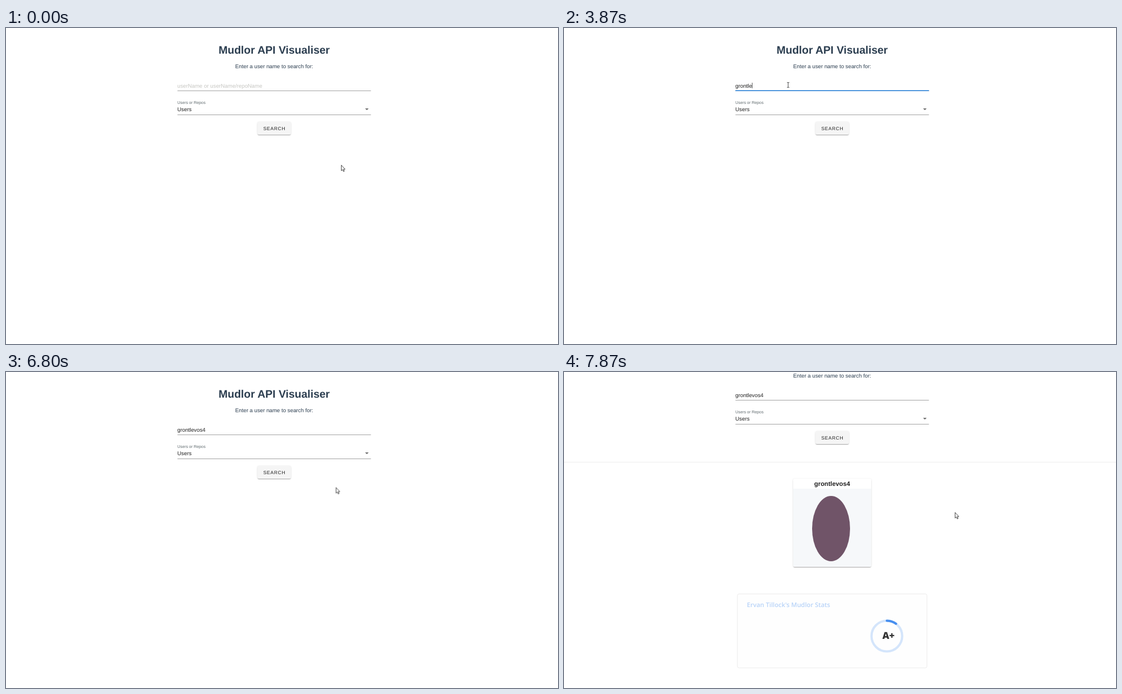
These frames come from a looping animation (990x566 px, 8000 ms). An HTML page:

```html
<!DOCTYPE html>
<html lang="en">
<head>
<meta charset="utf-8">
<title>API Visualiser</title>
<style>
  html, body { margin: 0; width: 100%; height: 100%; overflow: hidden; background: #fff; }
  #stage { position: relative; width: 990px; height: 566px; overflow: hidden; }
  #stage svg { position: absolute; left: 0; top: 0; overflow: visible; }
  #page, #button, #card, #tint, #ripple { position: absolute; }
  #page { left: 0; top: 0; width: 990px; height: 640px; }

  text { font: 9.75px "Liberation Sans", Arial, sans-serif; text-rendering: geometricPrecision; fill: #212121; white-space: pre; }
  .mid { text-anchor: middle; }
  .ink { fill: #2c3e50; }
  #heading { font-size: 19.5px; font-weight: bold; }
  #label { font-size: 7.28px; fill: #5f6a6e; }
  #hint { fill: #c6c6c2; }
  #search { font-size: 8.5px; letter-spacing: .0893em; }
  #cardName { font-size: 11.35px; font-weight: bold; }
  #statTitle { font: 600 11.3px "Open Sans", "Noto Sans", sans-serif; fill: #2f80ed; }
  #rank { font: 800 17px "Open Sans", "Noto Sans", sans-serif; fill: #333; }

  #button, #card {
    box-shadow: 0 1.9px .6px -1.2px rgba(0,0,0,.2), 0 1.2px 1.2px rgba(0,0,0,.14), 0 .6px 3px rgba(0,0,0,.12);
    border-radius: 2.5px; overflow: hidden;
  }
  #button { left: 451px; top: 168px; width: 60px; height: 22.5px; background: #f5f5f5; }
  #card { left: 411px; top: 253px; width: 140px; height: 157.5px; background: #fff; }
  #tint { inset: 0; background: #000; opacity: 0; }
  #ripple { left: -6px; top: -23.5px; width: 70px; height: 70px; border-radius: 50%; background: #000; opacity: 0; }

  #inputLine, #selectLine { fill: #a2a2a2; }
  #focusLine { transform-origin: 481px 112px; }
  #mouse path { stroke: #222; stroke-width: .85; stroke-linejoin: round; fill: #fff; }
  #mouse #beam { fill: none; }

  /* 1% of the loop is 80 ms */
  #page, #inputLine, #selectLine, #results, #loaded, #figure, #statTitle, #rank, #arc, #arrow, #beam, #hand {
    animation: 8s step-end infinite;
  }
  #tint, #ripple, #focusLine, #mouse { animation: 8s linear infinite; }

  #page { animation-name: scroll; }
  @keyframes scroll { 0% { transform: none; } 98.3%, 100% { transform: translateY(-62px); } }

  #inputLine { animation-name: inputHover; }
  @keyframes inputHover { 6.9% { fill: #5a5a5a; } 65%, 100% { fill: #a2a2a2; } }
  #selectLine { animation-name: selectHover; }
  @keyframes selectHover {
    4.9% { fill: #5a5a5a; } 6.9% { fill: #a2a2a2; }
    66% { fill: #5a5a5a; } 74%, 100% { fill: #a2a2a2; }
  }

  #focusLine { animation-name: focusLine; }
  @keyframes focusLine {
    0%, 14.1% { transform: scaleX(0); fill: #1976d2; animation-timing-function: cubic-bezier(.25,.8,.5,1); }
    17.5%, 76.87% { transform: scaleX(1); fill: #1976d2; }
    76.88% { transform: scaleX(1); fill: #22285f; animation-timing-function: cubic-bezier(.25,.8,.5,1); }
    80.6%, 100% { transform: scaleX(0); fill: #22285f; }
  }

  #tint { animation-name: tint; }
  @keyframes tint {
    0%, 3.3% { opacity: 0; } 3.8%, 4.6% { opacity: .07; } 5.2%, 75.4% { opacity: 0; }
    76%, 76.8% { opacity: .07; } 78.3%, 79.7% { opacity: .155; }
    80.8%, 83.6% { opacity: .07; } 84.6%, 100% { opacity: 0; }
  }
  #ripple { animation-name: ripple; }
  @keyframes ripple {
    0%, 76.87% { opacity: 0; transform: scale(.3); }
    77.3% { opacity: .24; }
    78.37% { opacity: .24; transform: scale(.7); }
    79.8% { opacity: .24; transform: scale(1); }
    80.85%, 100% { opacity: 0; transform: scale(1); }
  }

  #results { animation-name: results; }
  @keyframes results { 0% { visibility: hidden; } 85.8%, 100% { visibility: visible; } }
  #loaded { animation-name: loaded; }
  @keyframes loaded { 0% { opacity: 0; } 93.3%, 100% { opacity: 1; } }
  #figure { animation-name: figure; }
  @keyframes figure { 0% { opacity: 0; } 94.1%, 100% { opacity: 1; } }
  #statTitle { animation-name: statTitle; }
  @keyframes statTitle { 0% { opacity: 0; } 94.1% { opacity: .15; } 95%, 100% { opacity: .34; } }
  #rank { animation-name: rank; transform-origin: 579px 535px; }
  @keyframes rank { 0% { transform: scale(0); } 94.1% { transform: scale(.6); } 95%, 100% { transform: none; } }
  #arc { animation-name: arc; }
  @keyframes arc {
    0% { stroke-dasharray: 0 2; opacity: 0; }
    94.1% { stroke-dasharray: .045 2; opacity: .87; }
    95%, 100% { stroke-dasharray: .102 2; opacity: .87; }
  }

  #mouse { animation-name: mouse; }
  @keyframes mouse {
    0%, .6% { transform: translate(601px, 245px); }
    1.62%, 3.2% { transform: translate(505px, 193px); }
    9.9%, 63.9% { transform: translate(402px, 102px); }
    69.1%, 70.5% { transform: translate(398px, 143.5px); }
    71.6%, 73% { transform: translate(399.5px, 145px); }
    76.8%, 83.2% { transform: translate(478.5px, 181px); }
    87.2% { transform: translate(728px, 237px); }
    89.6%, 91% { transform: translate(691.5px, 243px); }
    93.3%, 100% { transform: translate(701px, 251px); }
  }
  #arrow { animation-name: arrow; }
  @keyframes arrow { 0% { visibility: visible; } 3.5% { visibility: hidden; } 83.9%, 100% { visibility: visible; } }
  #beam { animation-name: beam; }
  @keyframes beam { 0% { visibility: hidden; } 6.9% { visibility: visible; } 66%, 100% { visibility: hidden; } }
  #hand { animation-name: hand; }
  @keyframes hand {
    0% { visibility: hidden; } 3.5% { visibility: visible; } 6.9% { visibility: hidden; }
    66% { visibility: visible; } 83.9%, 100% { visibility: hidden; }
  }
</style>
</head>
<body>
<div id="stage">
  <div id="page">
    <div id="button"><div id="tint"></div><div id="ripple"></div></div>

    <svg width="990" height="640">
      <text id="heading" class="mid ink" x="481" y="46">Mudlor API Visualiser</text>
      <text class="mid ink" x="481" y="72.3">Enter a user name to search for:</text>

      <text id="hint" x="307.3" y="106.5">userName or userName/repoName</text>
      <text id="typed" x="307.3" y="106.5"></text>
      <rect id="caret" x="307.3" y="98" width=".8" height="10" fill="#333"/>
      <rect id="inputLine" x="307.5" y="112" width="347" height="1"/>
      <rect id="focusLine" x="307.5" y="111.5" width="347" height="1.5"/>

      <text id="label" x="307.3" y="135.5">Users or Repos</text>
      <text x="307.3" y="149">Users</text>
      <path d="M644 144H650.4L647.2 147.2Z" fill="#707070"/>
      <rect id="selectLine" x="307.5" y="155" width="347" height="1"/>

      <text id="search" class="mid" x="481.4" y="182.6">SEARCH</text>
    </svg>

    <div id="results">
      <div id="card"></div>
      <svg width="990" height="640">
        <rect y="223" width="990" height="1" fill="#eee"/>
        <text id="cardName" class="mid" x="481" y="266">grontlevos4</text>
        <g id="loaded">
          <path d="M411 271H551V408Q551 410.5 548.5 410.5H413.5Q411 410.5 411 408Z" fill="#f6f8fa"/>
          <ellipse id="figure" cx="479" cy="342.5" rx="34" ry="58.5" fill="#705468"/>
          <rect x="311" y="459.5" width="340" height="132.5" rx="3" fill="#fefefe" stroke="#e4e2e2" stroke-width=".7"/>
          <text id="statTitle" x="328" y="483">Ervan Tillock's Mudlor Stats</text>
          <g fill="none" stroke="#2f80ed" stroke-width="4.1">
            <circle cx="579" cy="535" r="27.5" opacity=".2"/>
            <circle id="arc" cx="579" cy="535" r="27.5" pathLength="1" stroke-linecap="round" transform="rotate(-90 579 535)"/>
          </g>
          <text id="rank" class="mid" x="582" y="540">A+</text>
        </g>
      </svg>
    </div>
  </div>

  <svg width="990" height="566">
    <g id="mouse">
      <path id="arrow" d="M.4.6V10.7L2.7 8.6 4.2 12.1 5.8 11.4 4.3 8H7.2Z"/>
      <path id="beam" d="M-2-4.6Q0-4.6 0-3.6V3.6Q0 4.6-2 4.6M2-4.6Q0-4.6 0-3.6M0 3.6Q0 4.6 2 4.6"/>
      <path id="hand" d="M-1 1Q0-.4 1 1V5Q2 4.2 2.6 5.2 3.8 4.6 4.2 5.7 5.6 5.3 5.7 6.8V9.5Q5.4 11.2 4.6 13H-.6Q-1.4 10.8-3.5 8.3-3.6 6.6-2 7.4L-1 8.4Z"/>
    </g>
  </svg>
</div>

<script>
  const LOOP = 8000, BLINK = 530, FOCUS = 1130, BLUR = 6150;
  const NAME = 'grontlevos4';
  const KEY_TIMES = [3070, 3130, 3270, 3400, 3530, 3660, 3800, 3930, 4070, 4270, 5330];
  const [hint, typed, caret] = ['hint', 'typed', 'caret'].map(id => document.getElementById(id));
  let start;

  function draw(now) {
    start ??= now;
    const t = (now - start) % LOOP;
    const count = KEY_TIMES.filter(k => k <= t).length;
    typed.textContent = NAME.slice(0, count);
    hint.style.visibility = count ? 'hidden' : 'visible';

    // The caret restarts its blink at every key press
    const last = count ? KEY_TIMES[count - 1] : FOCUS;
    const lit = t >= FOCUS && t < BLUR && Math.floor((t - last) / BLINK) % 2 === 0;
    caret.style.visibility = lit ? 'visible' : 'hidden';
    caret.setAttribute('x', 307.3 + (count ? typed.getComputedTextLength() : 0));
    requestAnimationFrame(draw);
  }
  requestAnimationFrame(draw);
</script>
</body>
</html>
```
